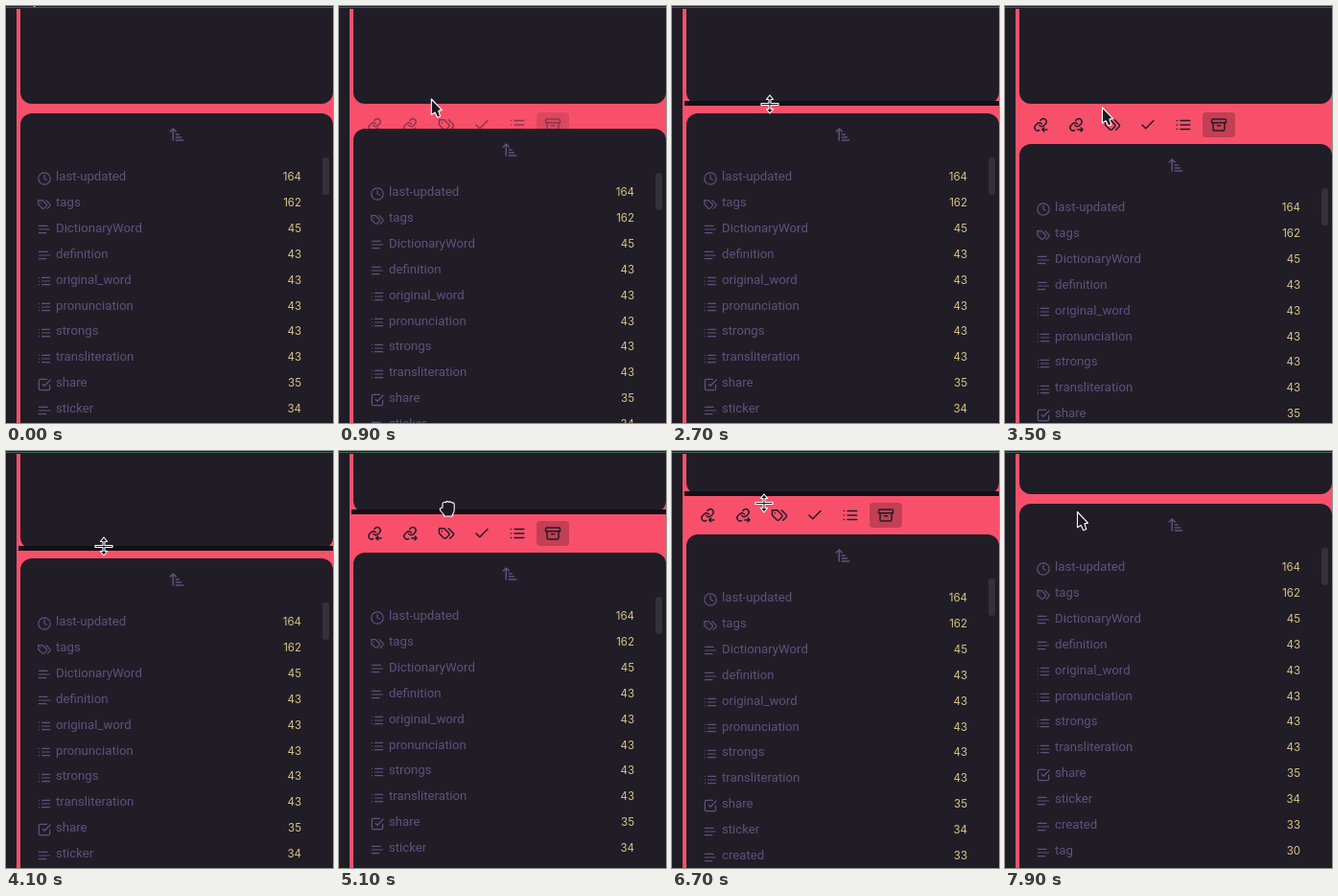
These frames come from a looping animation (341x435 px, 8 s). An HTML page:

```html
<!DOCTYPE html>
<html>
<head>
<meta charset="utf-8">
<style>
  html, body { margin: 0; width: 100%; height: 100%; overflow: hidden; background: #1f1c26; }
  svg { display: block; font-family: Roboto, sans-serif; }
  .icon { fill: none; stroke-linecap: round; stroke-linejoin: round; }
  .label { font-size: 13.2px; fill: #5b537c; }
  .count { font: 11.5px Inter, sans-serif; text-anchor: end; fill: #d8c486; }
  .cursor path { fill: #1b1921; stroke: #fff; stroke-width: 1.1; stroke-linejoin: round; }
</style>
</head>
<body>
<svg id="stage" width="341" height="435"></svg>
<script>
const LOOP = 8000, STEP = 100;
const PANEL = '#211d27', PINK = '#f8506b', MUTED = '#5b537c', BLACK = '#121016';

const link = 'M9 12.5a4.3 4.3 0 0 0 6.4.5l2.7-2.7a4.3 4.3 0 0 0-6-6l-1.6 1.5M12.6 10.8a4.3 4.3 0 0 0-6.4-.5l-2.7 2.7a4.3 4.3 0 0 0 5.4 6.5M13 18.5h7';
const icons = {
  linkIn: link + 'M15.5 16l-2.5 2.5 2.5 2.5',
  linkOut: link + 'M17.5 16l2.5 2.5-2.5 2.5',
  tags: 'M9 5H2v7l6.29 6.29c.94.94 2.48.94 3.42 0l3.58-3.58c.94-.94.94-2.48 0-3.42zM6 9v.01M15 5l6.3 6.3a2.4 2.4 0 0 1 0 3.4L17 19',
  check: 'M20 6L9 17l-5-5',
  list: 'M8 6h13M8 12h13M8 18h13M3 6h.01M3 12h.01M3 18h.01',
  archive: 'M4 4h16a2 2 0 0 1 2 2v3H2V6a2 2 0 0 1 2-2zM4 9v9a2 2 0 0 0 2 2h12a2 2 0 0 0 2-2V9M10 13h4',
  clock: 'M2 12a10 10 0 1 0 20 0a10 10 0 1 0-20 0M12 6v6l4 2',
  text: 'M17 6H3M21 12H3M15 18H3',
  box: 'M9 11l3 3L22 4M21 12v7a2 2 0 0 1-2 2H5a2 2 0 0 1-2-2V5a2 2 0 0 1 2-2h11',
  sort: 'M3 8l4-4 4 4M7 4v16M11 12h4M11 16h7M11 20h10'
};
const cursors = {
  arrow: 'M0 0V16.3L3.8 14 6.3 19.3 9.3 18 7.4 12.4 11 11.6Z',
  pointer: 'M-1.8 9V1.5a1.7 1.7 0 0 1 3.4 0V6l6.4 1.2q2.5.5 2.5 3v4l-1.7 5.3H-.5L-5 13q-1.4-2.3.6-3z',
  resize: 'M0-9.5L3.6-5H1V-1H9V1H1V5H3.6L0 9.5L-3.6 5H-1V1H-9V-1H-1V-5H-3.6Z',
  grab: 'M-5 0V-5q1.5-2 3.1-.8q1.5-2 3.2-.3q1.8-1.2 3.2.6q2.4-.6 2.7 1.5V2q0 3-2 5v1.5H-3.5V7L-7.5 2.5Q-8.3-.6-5-.5'
};
const rows = [
  ['clock', 'last-updated', 164], ['tags', 'tags', 162],
  ['text', 'DictionaryWord', 45], ['text', 'definition', 43],
  ['list', 'original_word', 43], ['list', 'pronunciation', 43],
  ['list', 'strongs', 43], ['list', 'transliteration', 43],
  ['box', 'share', 35], ['text', 'sticker', 34],
  ['text', 'created', 33], ['text', 'tag', 30]
];

// Each entry: first step, last step, values reached on the last step.
const gapMoves = [[0, 0, 102], [4800, 4900, 68], [5100, 5100, 64], [5200, 5400, 55],
  [5600, 5600, 50], [5800, 5800, 49], [6100, 6100, 45]];
const openMoves = [[0, 0, 0], [800, 1100, 1], [1700, 2000, 0], [2800, 3000, 1],
  [3800, 4100, 0], [4800, 4900, 1], [6900, 7200, 0]];
const lineMoves = [[0, 0, 0], [2400, 2500, 1], [2800, 2900, 0], [3800, 3900, 1], [6800, 6900, 0]];
const cursorMoves = [
  [0, 0, 23, -19, 'arrow'], [100, 600, 87, 83, 'arrow'], [800, 1000, 101, 104, 'arrow'],
  [1500, 1500, 102, 110.5, 'pointer'], [1600, 1900, 98, 57, 'arrow'], [2000, 2300, 101, 99, 'arrow'],
  [2400, 2400, 102, 99.5, 'resize'], [2700, 2700, 102, 102.5, 'resize'], [2800, 2800, 101.5, 104.5, 'arrow'],
  [3500, 3600, 101.5, 107, 'arrow'], [3800, 3900, 102, 99.5, 'resize'], [4500, 4600, 107, 85, 'grab'],
  [4800, 4900, 111, 63, 'grab'], [5100, 5100, 113, 59.5, 'grab'], [5200, 5400, 113, 50, 'grab'],
  [5600, 5600, 113, 45, 'grab'], [6100, 6100, 112, 40, 'grab'], [6700, 6700, 96, 54.5, 'resize'],
  [6800, 7200, 21, 134, 'arrow'], [7600, 7900, 75.5, 63.5, 'arrow']
];

function track(moves, t) {
  let value = moves[0].slice(2);
  for (const [from, to, ...target] of moves) {
    if (t < from) break;
    const p = Math.min(1, (t - from + STEP) / (to - from + STEP));
    value = target.map((v, i) => typeof v === 'string' ? v : value[i] + (v - value[i]) * p);
  }
  return value;
}

const icon = (name, x, y, scale, color) =>
  `<path class="icon" d="${icons[name]}" stroke="${color}" stroke-width="2" transform="translate(${x} ${y}) scale(${scale}) translate(-12 -12)"/>`;
const rect = (x, y, w, h, fill, extra = '') =>
  `<rect x="${x}" y="${y}" width="${w}" height="${h}" fill="${fill}" ${extra}/>`;

const tabs = ['linkIn', 'linkOut', 'tags', 'check', 'list', 'archive']
  .map((name, i) => icon(name, 38 + 37 * i, 22, .75, '#231c27')).join('');
const table = rows.map(([name, label, count], i) => {
  const y = Math.round(70 + 26.9 * i);
  return icon(name, 40, Math.round(67.6 + 26.9 * i), .62, MUTED) +
    `<text class="label" x="52" y="${y}">${label}</text>` +
    `<text class="count" x="308" y="${y}">${count}</text>`;
}).join('');

const stage = document.getElementById('stage');
stage.innerHTML =
  rect(11, 3, 330, 432, PINK) +
  rect(15, -20, 326, 122, PANEL, 'rx="12" id="upper"') +
  rect(0, 0, 341, 3, PANEL) + rect(0, 1, 341, 1, '#3d6252') +
  `<g id="bar">${rect(206, 9, 34, 26, '#000', 'rx="4" opacity=".22"')}
    ${rect(95, 9, 34, 26, '#000', 'rx="4" opacity=".22" id="hover"')}${tabs}</g>
  <g id="lower">${rect(15, 0, 326, 460, PANEL, 'rx="12"')}${icon('sort', 178, 22, .75, MUTED)}
    ${rect(330, 46, 7, 39, '#34313a', 'rx="3"')}${table}</g>` +
  rect(13, -3, 328, 5, BLACK, 'id="line"') +
  `<g id="tip"><path d="M107 144l5-5 5 5z" fill="${BLACK}"/>${rect(91, 144, 42, 26, BLACK, 'rx="4"')}
    <text x="112" y="159" font-size="12.2" fill="#e4e1e8" text-anchor="middle">Tags</text></g>
  <g class="cursor"><path id="cursor"/></g>`;

const el = id => document.getElementById(id);
const upper = el('upper'), bar = el('bar'), lower = el('lower'), line = el('line');
const hover = el('hover'), tip = el('tip'), cursor = el('cursor');
const place = (node, x, y) => node.setAttribute('transform', `translate(${x} ${y})`);

function draw(now) {
  const t = Math.floor(now % LOOP / STEP) * STEP;
  const [gap] = track(gapMoves, t), [open] = track(openMoves, t);
  const [x, y, kind] = track(cursorMoves, t);
  const visibility = kind === 'pointer' ? 'visible' : 'hidden';

  upper.setAttribute('height', gap + 20);
  place(bar, 0, gap);
  bar.setAttribute('opacity', open);
  place(lower, 0, Math.round(gap + 10 + 32 * open));
  place(line, 0, gap);
  line.setAttribute('opacity', track(lineMoves, t)[0]);
  hover.setAttribute('visibility', visibility);
  tip.setAttribute('visibility', visibility);
  cursor.setAttribute('d', cursors[kind]);
  place(cursor, x, y);
}

const start = performance.now();
function frame() {
  draw(performance.now() - start);
  requestAnimationFrame(frame);
}
frame();
</script>
</body>
</html>
```
